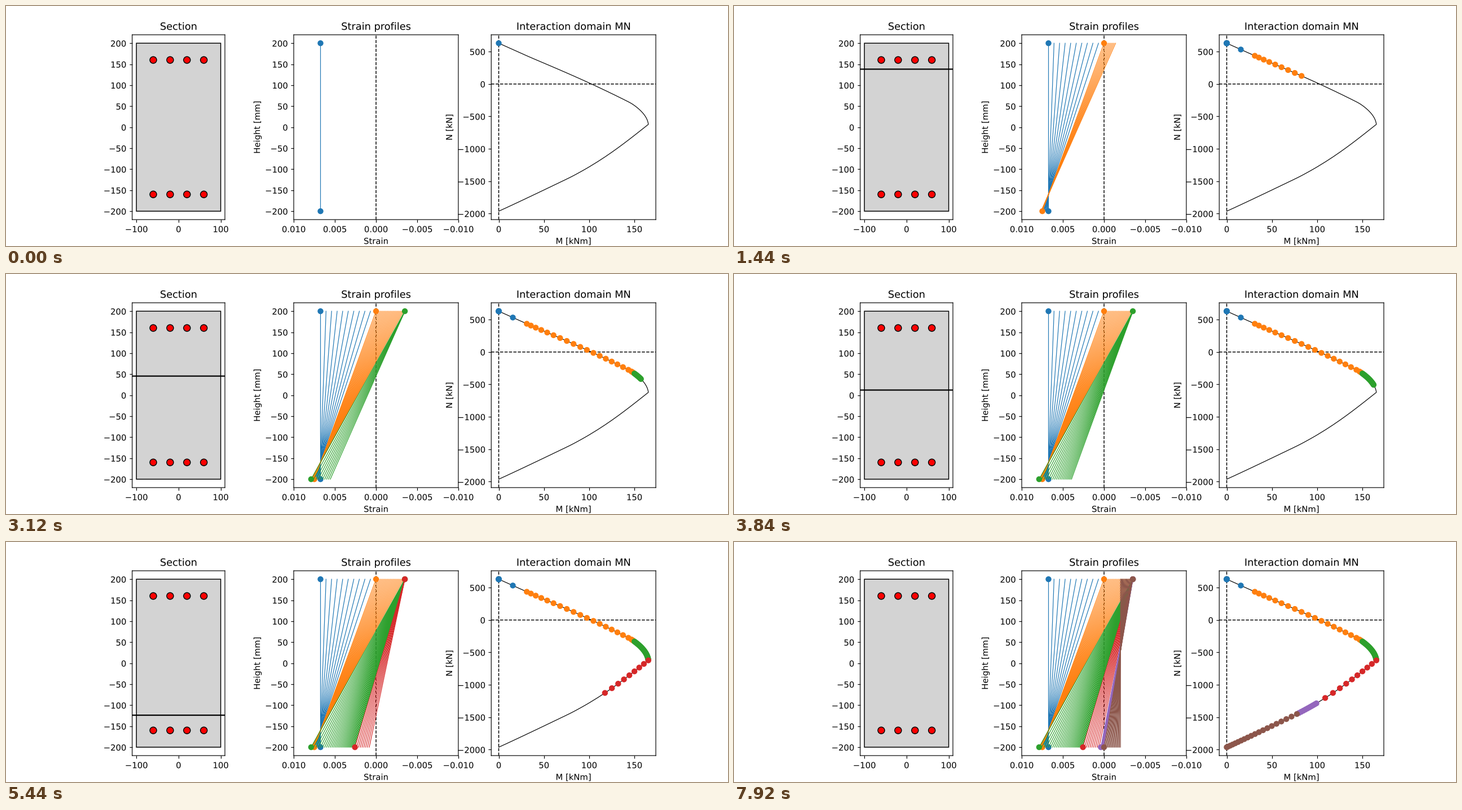
Write a matplotlib script that moves like this. It is 1280 by 427 pixels and loops after 8000 ms.

```python
import numpy as np
import matplotlib.pyplot as plt
from matplotlib.animation import FuncAnimation
from matplotlib.patches import Circle, Rectangle
from matplotlib.patheffects import Normal

# Draw text, markers and lines at sub-pixel positions
plt.rcParams.update({"path.snap": False, "path.effects": [Normal()]})

# Section geometry [mm] and materials [MPa]
WIDTH, HEIGHT, BAR_Z, BAR_D = 200, 400, 160, 16
TOP, BOTTOM = HEIGHT / 2, -HEIGHT / 2
BAR_X = (-60, -20, 20, 60)
FCD, EPS_C2, EPS_CU = 25 / 1.5, -0.002, -0.0035
FYD, ES, EPS_UD = 450 / 1.15, 200000, 0.00675
EPS_YD = FYD / ES


def strain_profiles():
    """Top and bottom strains of each ultimate strain field."""
    def extend(top, steel):
        top, steel = np.broadcast_arrays(top, steel)
        return top, top + (steel - top) * HEIGHT / (TOP + BAR_Z)

    steel_at_zero_bottom = EPS_CU * (HEIGHT - TOP - BAR_Z) / HEIGHT
    pivot = TOP - (1 - EPS_C2 / EPS_CU) * HEIGHT
    last_bottom = np.linspace(0, EPS_C2, 20)
    last_top = EPS_C2 + (EPS_C2 - last_bottom) * (TOP - pivot) / (pivot - BOTTOM)
    return [
        extend(np.linspace(EPS_UD, 0, 10, endpoint=False), EPS_UD),
        extend(np.linspace(0, EPS_CU, 20, endpoint=False), EPS_UD),
        extend(EPS_CU, np.geomspace(EPS_UD, EPS_YD, 30, endpoint=False)),
        extend(EPS_CU, np.linspace(EPS_YD, 0, 10, endpoint=False)),
        extend(EPS_CU, np.linspace(0, steel_at_zero_bottom, 10, endpoint=False)),
        (last_top, last_bottom),
    ]


def strain_at(z, top, bottom):
    return bottom + (top - bottom) * (z - BOTTOM) / HEIGHT


def resultants(top, bottom):
    """Moment [kNm] and axial force [kN] of one strain profile."""
    dz = HEIGHT / 4000
    z = np.arange(BOTTOM + dz / 2, TOP, dz)
    ratio = np.clip(strain_at(z, top, bottom) / EPS_C2, 0, 1)
    concrete = -FCD * (1 - (1 - ratio) ** 2) * WIDTH * dz
    bars = np.array([-BAR_Z, BAR_Z])
    area = len(BAR_X) * np.pi * BAR_D ** 2 / 4
    steel = np.clip(ES * strain_at(bars, top, bottom), -FYD, FYD) * area
    moment = -(concrete @ z + steel @ bars)
    return moment / 1e6, (concrete.sum() + steel.sum()) / 1e3


def neutral_axis(top, bottom):
    if abs(top - bottom) < 1e-9:
        return 10 * HEIGHT
    return BOTTOM - bottom * HEIGHT / (top - bottom)


fields = strain_profiles()
profiles = [(t, b) for tops, bottoms in fields for t, b in zip(tops, bottoms)]
domain = np.array([resultants(t, b) for t, b in profiles])
starts = np.cumsum([0] + [len(tops) for tops, _ in fields])

fig, (ax_sec, ax_eps, ax_mn) = plt.subplots(1, 3, figsize=(12, 4.0031), dpi=106.67)

ax_sec.set_title("Section")
ax_sec.add_patch(Rectangle((-WIDTH / 2, BOTTOM), WIDTH, HEIGHT,
                           facecolor="lightgray", edgecolor="black"))
for bar_z in (-BAR_Z, BAR_Z):
    for bar_x in BAR_X:
        ax_sec.add_patch(Circle((bar_x, bar_z), BAR_D / 2,
                                facecolor="red", edgecolor="black"))
ax_sec.set(xlim=(-110, 110), ylim=(-220, 220), aspect="equal")
axis_line = ax_sec.axhline(neutral_axis(*profiles[0]), color="black", lw=1.5)

ax_eps.set(title="Strain profiles", xlabel="Strain", ylabel="Height [mm]")
ax_eps.axvline(0, color="black", ls="--", lw=1)

ax_mn.set(title="Interaction domain MN", xlabel="M [kNm]", ylabel="N [kN]")
ax_mn.plot(*domain.T, color="black", lw=0.8)
ax_mn.axvline(0, color="black", ls="--", lw=1)
ax_mn.axhline(0, color="black", ls="--", lw=1)

profile_lines, field_dots = [], []
for k, (tops, bottoms) in enumerate(fields):
    for i, ends in enumerate(zip(tops, bottoms)):
        profile_lines += ax_eps.plot(ends, (TOP, BOTTOM), color=f"C{k}", lw=0.8,
                                     marker="" if i else "o")
    field_dots += ax_mn.plot([], [], "o", color=f"C{k}")
ax_eps.set(xlim=(0.01, -0.01), ylim=(-220, 220))


def update(frame):
    z = neutral_axis(*profiles[frame])
    axis_line.set_ydata([z, z])
    for i, line in enumerate(profile_lines):
        line.set_visible(i <= frame)
    for dots, first, last in zip(field_dots, starts, starts[1:]):
        dots.set_data(*domain[first:max(first, min(last, frame + 1))].T)
    return [axis_line, *profile_lines, *field_dots]


anim = FuncAnimation(fig, update, frames=len(profiles), interval=80,
                     init_func=lambda: update(0), repeat=True, repeat_delay=0)
plt.show()
```
